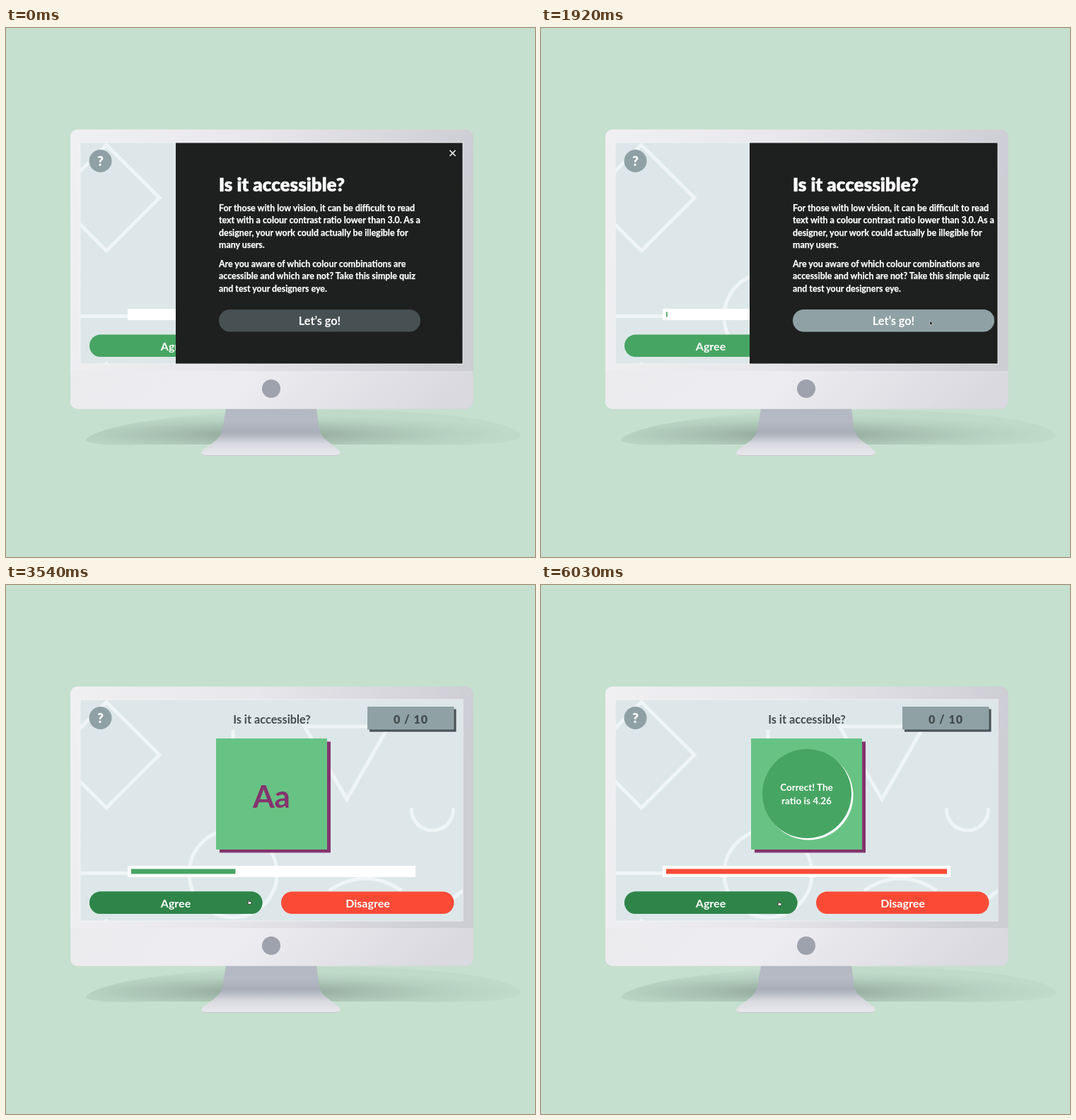
Write an HTML page that moves like this. It is 748 px wide and 748 px high and loops after 6060 ms.

```html
<!DOCTYPE html>
<html lang="en">
<head>
<meta charset="utf-8">
<title>Accessibility quiz</title>
<style>
html, body { margin: 0; width: 100%; height: 100%; overflow: hidden; background: #c5e0ce }
svg { display: block; width: 100%; height: 100% }
text { font: 700 16px Lato, "Open Sans", sans-serif; fill: #fff }
.mid { text-anchor: middle }
.copy { font-size: 12.4px; stroke: #fff; stroke-width: .25px }
.title { font-size: 26px; font-weight: 900; stroke: #fff; stroke-width: .5px }
.result { font-size: 13.5px }
.dark { fill: #434b4e }
</style>
</head>
<body>
<svg viewBox="0 0 748 748">
  <defs>
    <linearGradient id="case" x2="1" y2=".12">
      <stop stop-color="#f0f0f3"/><stop offset=".45" stop-color="#e8e7eb"/><stop offset="1" stop-color="#cdcdd4"/>
    </linearGradient>
    <linearGradient id="chin" x2="1" y2=".1">
      <stop stop-color="#ebebee"/><stop offset=".45" stop-color="#edecf0"/><stop offset="1" stop-color="#d9d9df"/>
    </linearGradient>
    <linearGradient id="stand" x2="0" y2="1">
      <stop stop-color="#b3b9c3"/><stop offset=".25" stop-color="#b5bac4"/><stop offset=".5" stop-color="#a9aeb9"/>
      <stop offset=".6" stop-color="#b9bdc6"/><stop offset=".75" stop-color="#d9dae0"/><stop offset="1" stop-color="#e9e9ed"/>
    </linearGradient>
    <radialGradient id="shade" cx=".42" cy=".7" r=".56">
      <stop stop-color="#8aa094"/><stop offset=".35" stop-color="#a3bbac"/>
      <stop offset=".7" stop-color="#b5d0bf"/><stop offset="1" stop-color="#bfdac8"/>
    </radialGradient>
    <clipPath id="view"><path d="M105.500 162.500h540v312h-540z"/></clipPath>
  </defs>

  <path d="M113 582C130 560 270 540 450 540C640 540 728 560 728 577C726 588 660 591 560 589H200C150 591 113 589 113 582Z" fill="url(#shade)"/>
  <path d="M311 538H439L443 568Q445 578 457 586L471 597Q476 604 467 605H282Q273 604 278 597L293 586Q304 578 306 568Z" fill="url(#stand)"/>
  <path d="M277 602Q278 604 283 604.500H466Q471 604 472 602" fill="none" stroke="#c4c5cc"/>
  <rect x="91" y="143.500" width="569.500" height="395" rx="10" fill="url(#case)"/>
  <path d="M91 485H660.500V528.500a10 10 0 0 1-10 10H101a10 10 0 0 1-10-10Z" fill="url(#chin)"/>
  <circle cx="375" cy="510" r="13" fill="#9da2ac"/>
  <rect x="105" y="162" width="541" height="313" fill="none" stroke="#f5f6f8"/>

  <g clip-path="url(#view)">
    <path d="M105 162h541v313h-541z" fill="#dde7e9"/>
    <g fill="none" stroke="#eff5f6" stroke-width="5">
      <path d="M142 165.500 217 240 142 315 67 240ZM134 483l8-8 8 8M105 407.500H258M321 205v20M422 200H541L482 303Z"/>
      <path d="M573.500 315.500v2a29.500 29.500 0 0 0 59 0v-2M457 432Q508 398 559 432M632 443l14-11"/>
      <circle cx="321" cy="408" r="62"/>
    </g>

    <circle cx="133.500" cy="188" r="16" fill="#8fa1a4"/>
    <text class="mid" x="133.500" y="195" style="font-size:19px;font-weight:900">?</text>
    <text class="mid dark" x="376" y="195.500" style="font-size:16.300px">Is it accessible?</text>
    <path d="M514 175.500h122.500v32h-122.500z" fill="#475052"/>
    <path d="M511 172h122.500v32.500h-122.500z" fill="#8fa1a4"/>
    <text class="mid dark" x="572.500" y="195.500" style="letter-spacing:1px;font-weight:900">0 / 10</text>

    <path d="M302 221.500h157v157h-157z" fill="#84346f"/>
    <path d="M297 217h157v157h-157z" fill="#67c383"/>
    <text class="mid" x="375.500" y="315" style="font-size:44px;fill:#84346f">Aa</text>
    <g id="result">
      <circle cx="378.500" cy="297.500" r="63" fill="#fff"/>
      <circle cx="376" cy="295" r="63" fill="#47a563"/>
      <text class="mid result" x="375.500" y="291">Correct! The</text>
      <text class="mid result" x="375.500" y="310">ratio is 4.26</text>
    </g>

    <path d="M172 397h407v16h-407z" fill="#fff"/>
    <rect id="bar" x="177" y="401.500" height="7"/>
    <rect x="118" y="433.500" width="244.500" height="31.500" rx="15.750" fill="#47a563"/>
    <rect id="agreeHover" x="118" y="433.500" width="244.500" height="31.500" rx="15.750" fill="#2f8549"/>
    <text class="mid" x="240" y="455.500">Agree</text>
    <rect x="389" y="433.500" width="244.500" height="31.500" rx="15.750" fill="#fb4b37"/>
    <text class="mid" x="511.500" y="455.500">Disagree</text>

    <g id="panel">
      <path d="M240 162h406v313h-406z" fill="#1e201f"/>
      <path d="M627.500 173l8 8m0-8-8 8" stroke="#fff" stroke-width="1.500"/>
      <text class="title" x="301" y="230.500">Is it accessible?</text>
      <g id="copy"></g>
      <rect x="301" y="398" width="285" height="31.500" rx="15.750" fill="#475052"/>
      <rect id="goHover" x="301" y="398" width="285" height="31.500" rx="15.750" fill="#8fa1a4"/>
      <text class="mid" x="443.500" y="420" style="font-size:16.300px">Let’s go!</text>
    </g>
  </g>

  <g id="cursor" stroke-linejoin="round">
    <path id="arrow" d="M0 0V6L1.400 4.900 2.300 6.800 3.200 6.400 2.400 4.500H4.200Z" fill="#000" stroke="#fff" stroke-width=".5"/>
    <path id="hand" transform="translate(-.8 0) scale(.85)" d="M0 0Q1-.8 1.500.3V2.300Q4.500 2 5 3.500V5L4 7H.8L-1.800 4Q-1.500 2.800 0 3.800Z" fill="#fff" stroke="#111" stroke-width=".8"/>
  </g>
</svg>
<script>
const LOOP = 6060, STEP = 30, CLICK_GO = 1740, CLICK_AGREE = 4440;
const $ = id => document.getElementById(id);
const ramp = (t, start, length) => Math.min(1, Math.max(0, (t - start) / length));
const smooth = x => x * x * (3 - 2 * x);
const show = (id, opacity) => $(id).setAttribute('opacity', opacity);

const copy = [
  [259, 'For those with low vision, it can be difficult to read'],
  [276, 'text with a colour contrast ratio lower than 3.0. As a'],
  [293.5, 'designer, your work could actually be illegible for'],
  [311, 'many users.'],
  [338, 'Are you aware of which colour combinations are'],
  [355, 'accessible and which are not? Take this simple quiz'],
  [372.5, 'and test your designers eye.']
];
$('copy').innerHTML = copy.map(([y, line]) => `<text class="copy" x="301" y="${y}">${line}</text>`).join('');

// Pointer stops: time, x, y
const stops = [
  [60, 640, 433], [660, 553, 412], [1020, 550, 414], [3000, 550, 414],
  [3270, 392, 420], [3500, 343.5, 445.5], [3700, 343.5, 445.5], [4140, 336.5, 447.5]
];

function pointerAt(t) {
  const next = stops.findIndex(s => s[0] > t);
  if (next < 0) return stops[stops.length - 1].slice(1);
  if (!next) return stops[0].slice(1);
  const [a, b] = [stops[next - 1], stops[next]];
  const k = smooth(ramp(t, a[0], b[0] - a[0]));
  return [a[1] + (b[1] - a[1]) * k, a[2] + (b[2] - a[2]) * k];
}

// Sine ease in and out, a little slower towards the end
function timer(t) {
  const x = ramp(t, CLICK_GO, 4290);
  return (1 - Math.cos(Math.PI * x)) / 2 - .2 * x ** 4 * (1 - x);
}

function draw(t) {
  const slide = Math.round(406 * ramp(t, CLICK_GO, 300) ** 3.9);
  $('panel').setAttribute('transform', `translate(${slide})`);
  $('bar').setAttribute('width', 397 * timer(t));
  $('bar').setAttribute('fill', t < CLICK_AGREE ? '#47a563' : '#fb4b37');
  show('result', ramp(t, CLICK_AGREE, 200));
  show('goHover', ramp(t, 400, 150));
  show('agreeHover', ramp(t, 3390, 120));

  const pointing = t > 400 && t < CLICK_GO || t > 3390;
  $('cursor').setAttribute('transform', `translate(${pointerAt(t)})`);
  show('cursor', t < 60 ? 0 : 1);
  show('arrow', pointing ? 0 : 1);
  show('hand', pointing ? 1 : 0);
}

const begin = performance.now();
function tick() {
  const t = (performance.now() - begin) % LOOP;
  draw(t - t % STEP);
  requestAnimationFrame(tick);
}
tick();
</script>
</body>
</html>
```
